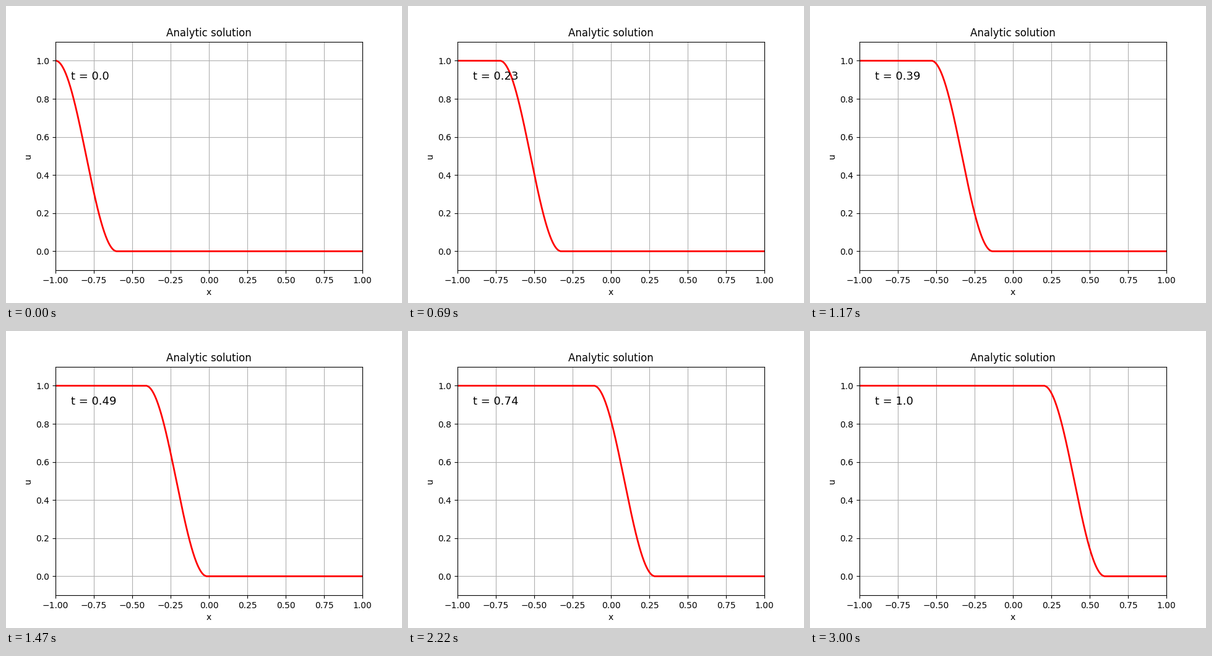
Write a matplotlib script that moves like this. It is 640 by 480 pixels and loops after 3.03 s.

```python
import matplotlib.pyplot as plt
import numpy as np
from matplotlib.animation import FuncAnimation

SPEED = 1.2
WIDTH = 0.4
FRAMES = 101
INTERVAL = 30

plt.rcParams["font.family"] = "DejaVu Sans"


def wave(x, t):
    """Half-cosine step from 1 to 0, advected to the right."""
    s = np.clip((x + 1 - SPEED * t) / WIDTH, 0, 1)
    return 0.5 * (1 + np.cos(np.pi * s))


x = np.linspace(-1, 1, 1001)

fig, ax = plt.subplots(figsize=(6.4, 4.8), dpi=100)
ax.set(xlim=(-1, 1), ylim=(-0.1, 1.1), xlabel="x", ylabel="u",
       title="Analytic solution")
ax.grid(True)
line, = ax.plot(x, wave(x, 0), color="red", lw=2)
label = ax.text(-0.9, 0.9, "t = 0.0", fontsize=13)


def update(i):
    t = round(i / (FRAMES - 1), 2)
    line.set_ydata(wave(x, t))
    label.set_text(f"t = {t}")
    return line, label


anim = FuncAnimation(fig, update, frames=FRAMES, interval=INTERVAL,
                     repeat=True, repeat_delay=0)
plt.show()
```
